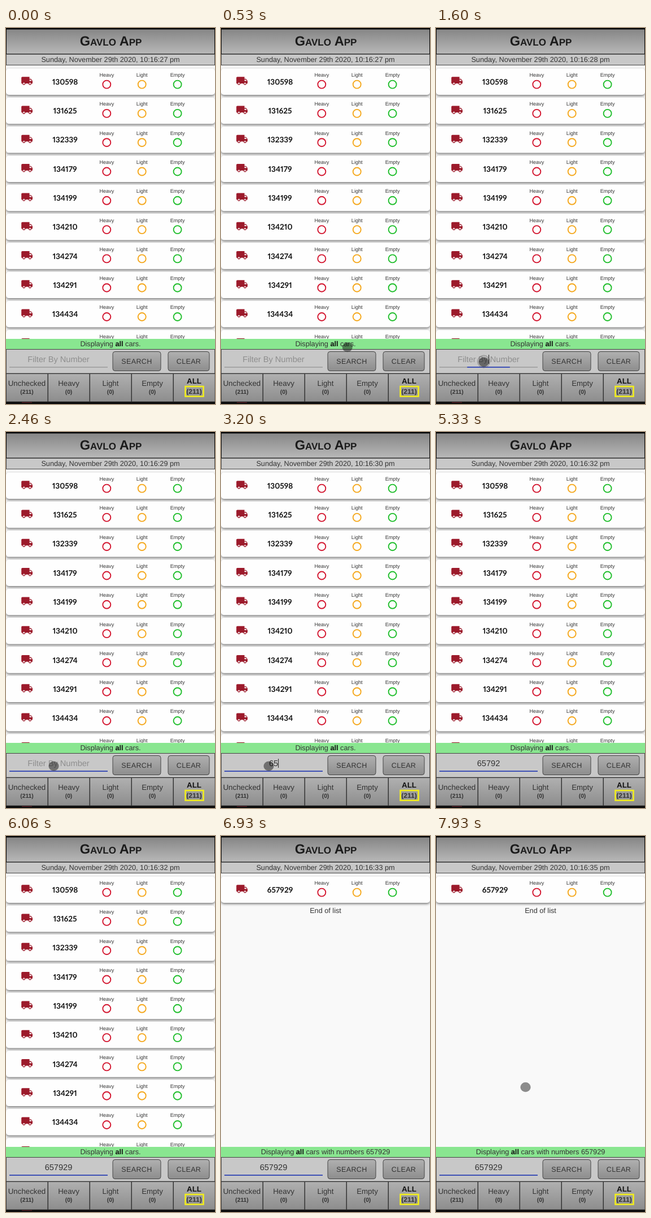
Write an HTML page that moves like this. It is 370x664 px and loops after 8000 ms.

```html
<!DOCTYPE html>
<html lang="en">
<head>
<meta charset="utf-8">
<title>Car checklist</title>
<style>
  html, body { margin: 0; width: 100%; height: 100%; overflow: hidden; background: #000; }
  svg { display: block; width: 370px; height: 664px; }
  text { font: 12.7px "Liberation Sans", Arial, sans-serif; fill: #333; text-anchor: middle; text-rendering: geometricPrecision; }
  .title { font-size: 23.6px; font-weight: bold; font-variant: small-caps; fill: #1b1b1b; }
  .label { font-size: 9.1px; }
  .number { font: 700 13.6px Lato, sans-serif; font-feature-settings: "pnum"; fill: #111; }
  .field { font-size: 14.6px; }
  .button { font-size: 12.5px; letter-spacing: .36px; }
  .tab { font-size: 13.3px; }
  .count { font-size: 10.3px; font-weight: bold; }
  .bold { font-weight: bold; fill: #111; }
  .card { fill: #fefefe; filter: drop-shadow(0 2px 2px #0008); }
  .ring { fill: none; stroke-width: 1.9; }
</style>
</head>
<body>
<svg viewBox="0 0 370 664">
  <defs>
    <linearGradient id="head" x2="0" y2="1"><stop stop-color="#868686"/><stop offset="1" stop-color="#b8b8b8"/></linearGradient>
    <linearGradient id="metal" x2="0" y2="1"><stop stop-color="#b0b0b0"/><stop offset="1" stop-color="#8d8d8d"/></linearGradient>
    <path id="truck" fill="#9c1a2b" transform="translate(26.3 82.6) scale(.9)" d="M20 8h-3V4H3c-1.1 0-2 .9-2 2v11h2c0 1.66 1.34 3 3 3s3-1.34 3-3h6c0 1.66 1.34 3 3 3s3-1.34 3-3h2v-5l-3-4zM6 18.5c-.83 0-1.5-.67-1.5-1.5s.67-1.5 1.5-1.5 1.5.67 1.5 1.5-.67 1.5-1.5 1.5zm13.5-9l1.96 2.5H17V9.5h2.5zm-1.5 9c-.83 0-1.5-.67-1.5-1.5s.67-1.5 1.5-1.5 1.5.67 1.5 1.5-.67 1.5-1.5 1.5z"/>
  </defs>
  <rect y="66" width="370" height="484" fill="#f9f9f9"/>
  <g id="cars"></g>
  <g id="found"><text x="185" y="136">End of list</text></g>

  <rect width="370" height="46" fill="#000"/>
  <rect x="1" y="2.5" width="368" height="43" fill="url(#head)"/>
  <text class="title" x="185.5" y="31">Gavlo App</text>
  <rect x=".5" y="46.5" width="369" height="19" fill="#c8c8c8" stroke="#444"/>
  <text id="clock" x="185" y="60"></text>

  <rect y="549" width="370" height="18.5" fill="#89e690"/>
  <text x="185" y="561.5">Displaying <tspan class="bold">all</tspan> cars<tspan id="query"></tspan></text>

  <rect y="609" width="370" height="55" fill="#0b0b0b"/>
  <rect id="peek" x="28" y="660.5" width="18" height="1.5" fill="#541820"/>
  <rect x=".5" y="567.5" width="369" height="42.5" fill="#c8c8c8" stroke="#444"/>
  <rect x="6" y="598.5" width="174" height="1" fill="#858585"/>
  <rect id="focus" y="598" height="2" fill="#3f51b5"/>
  <text id="value" class="field" x="93" y="590"></text>
  <rect id="caret" y="577" width="1" height="16" fill="#222"/>
  <g id="controls"></g>
  <circle id="ripple" cx="84.5" cy="589" fill="#000" fill-opacity=".18" stroke="#555"/>
  <ellipse id="dot" rx="8.8" ry="8.2" fill="#000" fill-opacity=".44" stroke="#555" stroke-opacity=".35"/>
</svg>
<script>
const LOOP = 8000, ROW = 51.3;
const $ = id => document.getElementById(id);
const add = (id, markup) => $(id).insertAdjacentHTML('beforeend', markup);
const show = (id, on) => $(id).style.display = on ? '' : 'none';
const passed = (times, t) => times.filter(at => t >= at).length;
const progress = (t, start, end) => Math.min(1, Math.max(0, (t - start) / (end - start)));

const statuses = [['Heavy', 178.3, '#d3162f'], ['Light', 240.7, '#f5a81c'], ['Empty', 303.6, '#1fbe2b']];
const car = (number, i) => `<g transform="translate(0 ${i * ROW})">
  <rect class="card" y="71.5" width="370" height="46.5" rx="5"/>
  <use href="#truck"/>
  <text class="number" x="104.5" y="99.8">${number}</text>
  ${statuses.map(([name, x, color]) => `<text class="label" x="${x}" y="86">${name}</text>
    <circle class="ring" cx="${x}" cy="99.6" r="7" stroke="${color}"/>`).join('')}</g>`;

const numbers = [130598, 131625, 132339, 134179, 134199, 134210, 134274, 134291, 134434, 134512];
add('cars', numbers.map(car).join(''));
add('found', car(657929, 0));

for (const [name, x, w] of [['SEARCH', 189, 85], ['CLEAR', 287, 73]])
  add('controls', `<rect x="${x}" y="571.5" width="${w}" height="34" rx="4" fill="url(#metal)" stroke="#444"/>
    <text class="button" x="${x + w / 2}" y="592.7">${name}</text>`);

['Unchecked (211)', 'Heavy (0)', 'Light (0)', 'Empty (0)', 'ALL (211)'].forEach((tab, i) => {
  const [name, count] = tab.split(' '), x = i * 74 + 37, all = name === 'ALL';
  add('controls', `<rect x="${i * 74 + .5}" y="610.5" width="73.5" height="49.5" fill="url(#metal)" stroke="#333"/>
    <text class="tab ${all ? 'bold' : ''}" x="${x}" y="${all ? 628 : 632}">${name}</text>
    <text class="count" x="${x}" y="646" ${all ? 'style="font-size:12px"' : ''}>${count}</text>`);
});
add('controls', '<rect x="317.5" y="633" width="32" height="17.5" fill="none" stroke="#f2ee1c" stroke-width="2.6"/>');

const PRESS = 1460, FOCUS = 1530, SEARCH = 6200;
const ticks = [960, 2000, 3000, 3930, 4930, SEARCH, 7000, 7930];
const keys = [2930, 3200, 3600, 3930, 4530, 5530];
const blinks = [1600, 2130, 2660, 4460, 4530, 5060, 5530, 6060, 6400, 6930, 7430, 7930];

const move = (from, to, p) => from.map((v, i) => v + (to[i] - v) * p);
const smooth = p => p * p * (3 - 2 * p);

function render(t) {
  $('clock').textContent = `Sunday, November 29th 2020, 10:16:${27 + passed(ticks, t)} pm`;

  const found = t >= SEARCH;
  show('cars', !found);
  show('peek', !found);
  show('found', found);
  $('query').textContent = found ? ' with numbers 657929' : '.';

  const typed = '657929'.slice(0, passed(keys, t));
  $('value').textContent = typed || 'Filter By Number';
  $('value').style.fill = typed ? '#333' : '#8e8e8e';
  $('caret').setAttribute('x', 93 + typed.length * 4.06);
  show('caret', passed(blinks, t) % 2);

  const grow = 1 - (1 - progress(t, FOCUS, FOCUS + 200)) ** 1.3;
  $('focus').setAttribute('x', 93 - 87 * grow);
  $('focus').setAttribute('width', 174 * grow);

  const press = progress(t, PRESS, PRESS + 280);
  $('ripple').setAttribute('r', 8 + 6 * press);
  $('ripple').setAttribute('opacity', press && 1 - press);

  const field = [84.5, 590];
  const [x, y] = t < 7000
    ? move([423, 526], field, progress(t, 60, 860))
    : move(field, [158.5, 443.5], smooth(progress(t, 7400, 7930)));
  $('dot').setAttribute('cx', x);
  $('dot').setAttribute('cy', y);
  show('dot', t < 3600 || t >= 7400);
}

const begin = performance.now();
(function frame() {
  render((performance.now() - begin) % LOOP);
  requestAnimationFrame(frame);
})();
</script>
</body>
</html>
```
